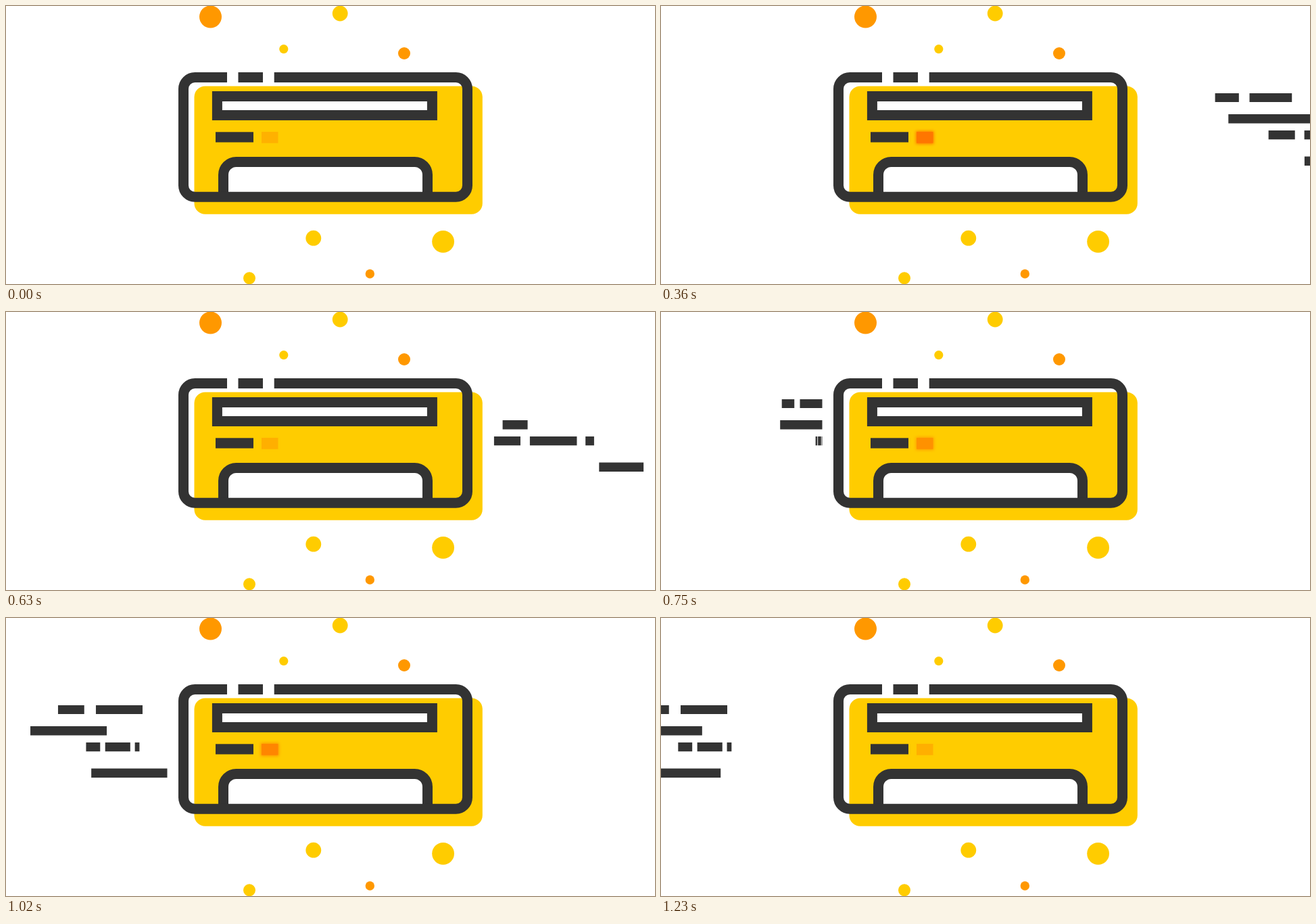
An HTML page that plays this animation: 960x411 px, repeating every 1.26 s.

```html
<!DOCTYPE html>
<html lang="en">
<head>
<meta charset="utf-8">
<title>Air conditioner</title>
<style>
  html, body { margin: 0; width: 100%; height: 100%; overflow: hidden; background: #fff; }
  svg { display: block; width: 100%; height: 100%; }
  .dark { fill: #333; }
  .line { fill: #fff; stroke: #333; stroke-width: 15; }
  .sun { fill: #fc0; }
  .orange { fill: #ff9800; }
  .white { fill: #fff; }
</style>
</head>
<body>
<svg viewBox="0 0 960 411">
  <defs>
    <filter id="soft" x="-50%" y="-50%" width="200%" height="200%">
      <feGaussianBlur stdDeviation="2"/>
    </filter>
  </defs>

  <g class="orange">
    <circle cx="302.5" cy="16" r="16.5"/>
    <circle cx="589" cy="70" r="9"/>
    <circle cx="538.3" cy="396" r="6.7"/>
  </g>
  <g class="sun">
    <circle cx="494.2" cy="11" r="11.4"/>
    <circle cx="410.8" cy="63.6" r="6.6"/>
    <circle cx="454.8" cy="343.2" r="11.4"/>
    <circle cx="646.6" cy="348.3" r="16.4"/>
    <circle cx="360" cy="402.3" r="9"/>
    <rect x="278.5" y="118.5" width="426.3" height="189.2" rx="16"/>
  </g>

  <path class="line" d="M321.5 282V249.5a19 19 0 0 1 19-19H604.5a19 19 0 0 1 19 19V282"/>
  <rect class="line" style="fill:none" x="262.5" y="105.5" width="420" height="176.7" rx="17"/>
  <path class="white" d="M327 97h16.5v17H327zM380 97h16.7v17H380z"/>
  <rect class="line" x="312.4" y="133.5" width="318" height="28"/>
  <rect class="dark" x="310" y="186.3" width="56" height="15.2"/>

  <rect id="glow" x="377" y="185" width="26.5" height="19" fill="#ff7000" filter="url(#soft)"/>
  <rect id="lamp" x="378" y="186" width="24.5" height="16.7"/>
  <path id="wind" class="dark"/>
</svg>
<script>
const LOOP = 1260, STEP = 30, BLINK = 600;
const EDGE = 960, INLET = 715, OUTLET = 238.5;
const lamp = document.getElementById("lamp");
const glow = document.getElementById("glow");
const wind = document.getElementById("wind");

const ramp = (t, from, to) => Math.min(1, Math.max(0, (t - from) / (to - from)));
const easeOut = (u, p) => 1 - (1 - u) ** p;
const since = (t, from) => Math.max(0, t - from) / 300;

// Each row flies in, is squeezed into the inlet, grows at the outlet and flies off.
// dashes: fractions of the width; enter, leave: distance flown at time t.
const rows = [
  { y: 129, h: 13, dashes: [[0, .31], [.448, 1]],
    width: 125, enter: t => .39 * t, shrink: [333, 630],
    outWidth: 125, grow: [640, 870], leave: t => 112 * since(t, 880) ** 1.47 },
  { y: 160, h: 13.5, dashes: [[0, 1]],
    width: 158, enter: t => 245 * easeOut(ramp(t, 225, 1090), 4), shrink: [450, 685],
    outWidth: 113, grow: [680, 807], leave: t => 126 * since(t, 807) },
  { y: 184, h: 13.3, dashes: [[0, .264], [.358, .828], [.914, 1]],
    width: 148, enter: t => .17 * t + 131 * (t / 630) ** 12, shrink: [630, 750],
    outWidth: 79, grow: [730, 890], leave: t => 120 * since(t, 900) ** 1.17 },
  { y: 222.5, h: 13.5, dashes: [[0, 1]],
    width: 148, enter: t => .017 * t + 72 * (t / 630) ** 6.4, shrink: [480, 750],
    outWidth: 148, grow: [831, 1080], leave: t => 280 * since(t, 1069) }
];

function dashPath({ y, h, dashes }, x, w) {
  if (w <= 0) return "";
  return dashes.map(([a, b]) =>
    `M${x + a * w} ${y}h${(b - a) * w}v${h}h${(a - b) * w}z`).join("");
}

function rowPath(row, t) {
  const w = row.width * (1 - ramp(t, ...row.shrink));
  const out = row.outWidth * ramp(t, ...row.grow);
  return dashPath(row, Math.max(INLET, EDGE - row.enter(t)), w)
    + dashPath(row, OUTLET - row.leave(t) - out, out);
}

function draw(now) {
  const t = Math.floor((now % LOOP) / STEP) * STEP;
  wind.setAttribute("d", rows.map(row => rowPath(row, t)).join(""));

  const heat = (1 - Math.cos(2 * Math.PI * t / BLINK)) / 2;
  lamp.setAttribute("fill", `rgb(255,${Math.round(177 - 65 * heat)},0)`);
  glow.setAttribute("opacity", heat.toFixed(3));
}

const start = performance.now();
function tick() {
  draw(performance.now() - start);
  requestAnimationFrame(tick);
}
tick();
</script>
</body>
</html>
```
